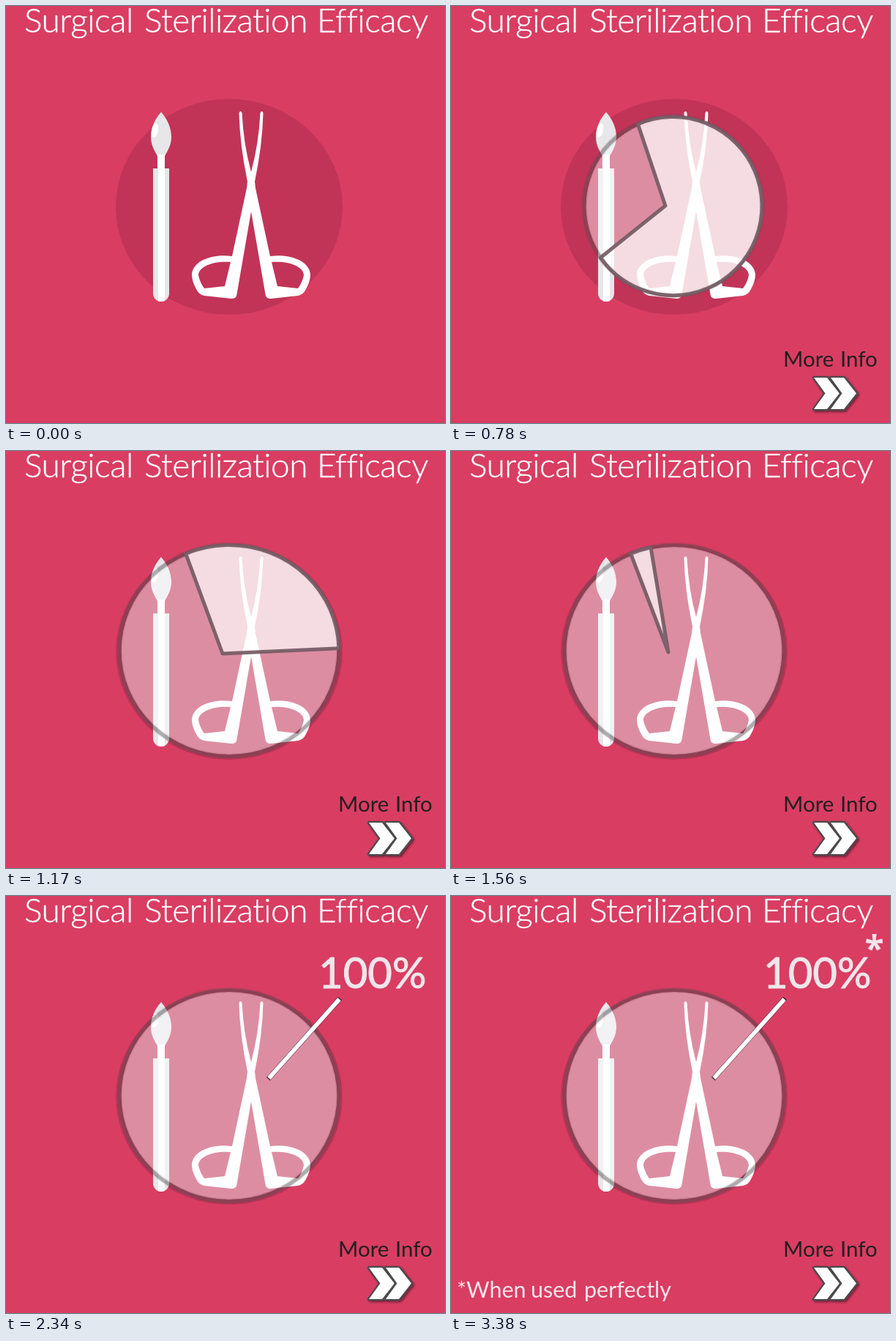
Write an HTML page with a canvas that moves like this. It is 600 by 570 pixels and loops after 7020 ms.

```html
<!DOCTYPE html>
<html lang="en">
<head>
<meta charset="utf-8">
<title>Surgical Sterilization Efficacy</title>
<style>
html, body { margin: 0; width: 100%; height: 100%; overflow: hidden; background: #d93d62; }
canvas { display: block; }
</style>
</head>
<body>
<canvas id="stage" width="600" height="570"></canvas>
<script>
const ctx = document.getElementById('stage').getContext('2d');
const LOOP = 7020, TICK = 130;
const RAD = Math.PI / 180;
const START = -113.3 * RAD;

// tick, centre x/y, radius x/y, slice tip x/y, slice sweep in degrees
const PIE = [
  [3, 297, 269, 11, 11, 294, 268, 350],
  [4, 298.5, 270, 47, 47.5, 293, 268.5, 331],
  [6, 303.5, 273.5, 121.5, 122, 293, 273, 258],
  [7, 305, 273, 150, 144.5, 294, 275, 209],
  [9, 305, 273, 150, 144.5, 296, 277, 112],
  [12, 305, 273, 150, 144.5, 297, 275, 11]
];

const clamp = v => Math.max(0, Math.min(1, v));

function sample(keys, t) {
  let i = 0;
  while (i < keys.length - 2 && t > keys[i + 1][0]) i++;
  const a = keys[i], b = keys[i + 1];
  const k = clamp((t - a[0]) / (b[0] - a[0]));
  return a.map((v, j) => v + (b[j] - v) * k);
}

function fill(path, color, rule) {
  ctx.fillStyle = color;
  ctx.fill(path, rule || 'nonzero');
}

function stroke(path, color, width) {
  ctx.strokeStyle = color;
  ctx.lineWidth = width;
  ctx.stroke(path);
}

function ellipse(x, y, rx, ry, turn = 0) {
  const p = new Path2D();
  p.ellipse(x, y, rx, ry, turn, 0, Math.PI * 2);
  return p;
}

// Each word is placed by the left edge of its ink; heft thickens the strokes.
function words(list, y, font, color, { heft = 0, spacing = 0 } = {}) {
  ctx.font = font;
  ctx.letterSpacing = spacing + 'px';
  ctx.fillStyle = ctx.strokeStyle = color;
  ctx.lineWidth = heft;
  ctx.lineJoin = 'round';
  for (const [word, x] of list) {
    const left = x + ctx.measureText(word).actualBoundingBoxLeft;
    ctx.fillText(word, left, y);
    if (heft) ctx.strokeText(word, left, y);
  }
  ctx.letterSpacing = '0px';
}

const blade = new Path2D('M212 145C204 154 198 166 198 179C198 190 203 198 207 205H217C221 198 226 190 226 179C226 166 220 154 212 145Z');
const handle = new Path2D('M201 222H223V393A11 11 0 0 1 201 393Z');
const halfScissors = new Path2D(
  'M318.5 146Q320.5 142 322.5 146Q324.5 188 335 227L335.5 240V278L315.5 394' +
  'Q315 400 308 400L271 396Q264 395 260 387Q254 376 254 367C255 348 283 338 309 342' +
  'L329 249L330 240Q319.5 190 318.5 146Z' +
  'M307 350C284 348 263 356 263 368Q265 378 271 386L299 383Z');

function scalpel() {
  fill(blade, '#e7e6e8');
  fill(ellipse(203.5, 170, 4.5, 10, 0.2), '#fff');
  ctx.fillStyle = '#fff';
  ctx.fillRect(207, 203, 10, 20);
  fill(handle, '#e7e6e8');
  ctx.save();
  ctx.clip(handle);
  ctx.fillStyle = '#fff';
  ctx.fillRect(208, 222, 9, 182);
  ctx.restore();
}

function scissors() {
  fill(halfScissors, '#fff', 'evenodd');
  ctx.save();
  ctx.translate(670, 0);
  ctx.scale(-1, 1);
  fill(halfScissors, '#fff', 'evenodd');
  ctx.restore();
}

function pie(tick) {
  if (tick < PIE[0][0]) return;
  const [, cx, cy, rx, ry, vx, vy, sweep] = sample(PIE, tick);
  const ring = ellipse(cx, cy, rx, ry);
  fill(ellipse(cx, cy, rx - 2.5, ry - 2.5), 'rgba(255,255,255,.44)');
  stroke(ring, 'rgba(85,60,70,.12)', 8);
  stroke(ring, 'rgba(80,80,80,.4)', 5);
  if (tick > 12) return;
  const slice = new Path2D();
  slice.moveTo(vx, vy);
  slice.ellipse(cx, cy, rx, ry, 0, START, START + sweep * RAD);
  slice.closePath();
  fill(slice, 'rgba(255,255,255,.69)');
  ctx.lineJoin = 'round';
  stroke(slice, 'rgba(118,92,101,.93)', 5);
}

function chevron(x) {
  const p = new Path2D(`M${x} 508h18l17 21.5l-17 21.5h-18l15.5 -21.5Z`);
  ctx.save();
  ctx.lineJoin = 'round';
  ctx.shadowColor = 'rgba(50,20,30,.6)';
  ctx.shadowBlur = 3;
  ctx.shadowOffsetX = ctx.shadowOffsetY = 2;
  stroke(p, '#4d4a4c', 4.5);
  ctx.restore();
  fill(p, '#fff');
}

function scaled(x, y, k, draw) {
  ctx.save();
  ctx.translate(x, y);
  ctx.scale(k, k);
  ctx.translate(-x, -y);
  draw();
  ctx.restore();
}

function moreInfo(tick) {
  if (tick < 1) return;
  const size = [0, 0.85, 0.88, 0.92, 0.955, 1.04][tick] || 1;
  ctx.globalAlpha = clamp(tick / 4);
  scaled(456, 493, size, () =>
    words([['More', 456], ['Info', 534]], 493, '400 29.5px Lato, sans-serif', '#231f20'));
  scaled(525.5, 529.5, size, () => {
    chevron(496);
    chevron(519);
  });
  ctx.globalAlpha = 1;
}

function pointer(tick) {
  const k = clamp((tick - 14) / 3);
  if (!k) return;
  const dx = 98 * k, dy = -110 * k, len = Math.hypot(dx, dy);
  ctx.save();
  ctx.translate(358.5, 250);
  ctx.rotate(Math.atan2(dy, dx));
  ctx.fillStyle = '#3a2028';
  ctx.fillRect(0, -3.4, len, 6.8);
  ctx.fillStyle = '#fff';
  ctx.fillRect(1.3, -2.9, len - 2.6, 5.8);
  ctx.restore();
}

function asterisk() {
  ctx.font = '700 48px "Open Sans", sans-serif';
  ctx.fillStyle = '#f0e6e9';
  const m = ctx.measureText('*');
  ctx.fillText('*',
    578.5 + (m.actualBoundingBoxLeft - m.actualBoundingBoxRight) / 2,
    63 + (m.actualBoundingBoxAscent - m.actualBoundingBoxDescent) / 2);
}

function draw(ms) {
  const tick = Math.floor((ms % LOOP) / TICK);
  ctx.fillStyle = '#d93d62';
  ctx.fillRect(0, 0, 600, 570);
  words([['Surgical', 27], ['Sterilization', 191], ['Efficacy', 429]], 36,
    '300 46px Lato, sans-serif', '#fff', { heft: 0.4, spacing: -0.5 });
  fill(ellipse(305, 274.5, 155, 147.5), '#c13458');
  scalpel();
  scissors();
  pie(tick);
  moreInfo(tick);
  pointer(tick);
  if (tick >= 18) words([['100%', 431]], 126, '400 58px Lato, sans-serif', '#f0e6e9', { heft: 1 });
  if (tick >= 22) asterisk();
  if (tick >= 26) {
    words([['*When', 9], ['used', 111], ['perfectly', 184]], 549,
      '400 30.5px Lato, sans-serif', '#f6e6eb');
  }
}

const begin = performance.now();
function loop() {
  draw(performance.now() - begin);
  requestAnimationFrame(loop);
}
loop();
</script>
</body>
</html>
```
